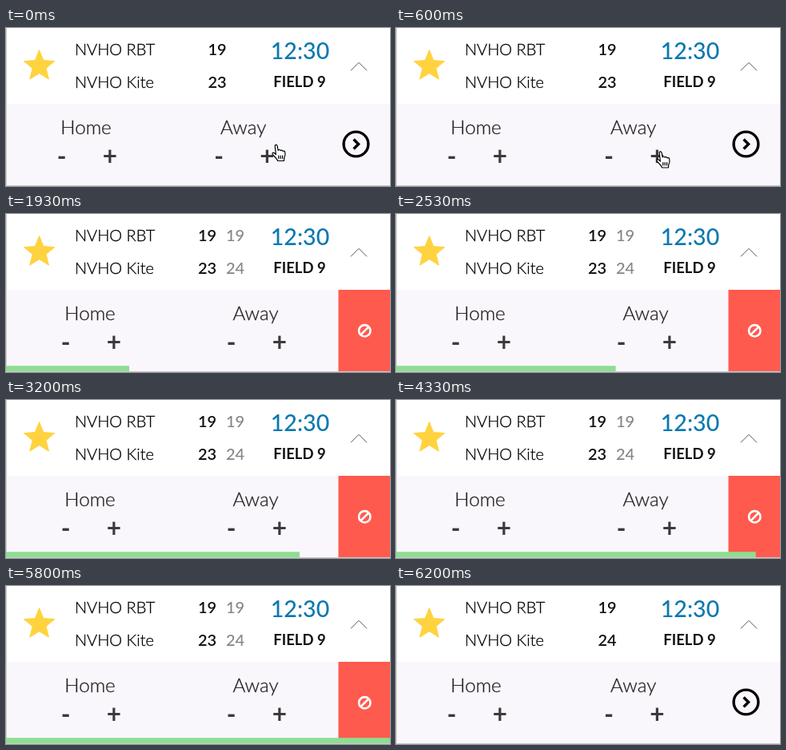
An HTML page for the animation above (6270 ms loop, 480 px wide and 198 px high).

```html
<!DOCTYPE html>
<html lang="en">
<head>
<meta charset="utf-8">
<title>Score entry with undo</title>
<style>
  html, body { margin: 0; width: 100%; height: 100%; overflow: hidden; background: #fff; }
  svg { display: block; width: 480px; height: 198px; font-family: Lato, "Open Sans", sans-serif; }
  text { fill: #111; }
  .team { font-size: 20px; font-weight: 300; fill: #000; stroke: #000; stroke-width: .3; }
  .mid { text-anchor: middle; }
  .score { font-size: 20px; font-weight: 600; }
  .next { font-size: 20px; font-weight: 500; fill: #858585; }
  .time { font-size: 28.6px; font-weight: 500; fill: #0b78b0; }
  .field { font-size: 18.5px; font-weight: 700; }
  .side { font-size: 24.2px; font-weight: 300; fill: #222; stroke: #222; stroke-width: .3; }
  .step { font-size: 31.5px; font-weight: 700; fill: #3a393c; }
  .line { fill: none; stroke: #000; }
</style>
</head>
<body>
<svg viewBox="0 0 480 198">
  <rect width="480" height="198" fill="#fff"/>
  <rect y="95" width="480" height="102" fill="#faf7fc"/>
  <path d="M.5 0V197M0 197.5H480" class="line" style="stroke:#cbcacb"/>

  <polygon id="star" fill="#ffd33f" stroke="#ffd33f" stroke-linejoin="round"/>
  <text class="team" x="86" y="34">NVHO RBT</text>
  <text class="team" x="86" y="75">NVHO Kite</text>
  <text class="time mid" x="367.5" y="39">12:30</text>
  <text class="field mid" x="367" y="73.7">FIELD 9</text>
  <path d="M431 53.3L441 43.3L451 53.3" class="line" style="stroke:#555"/>

  <text id="home" class="score mid" y="34">19</text>
  <text id="away" class="score mid" y="75">23</text>

  <g id="idle">
    <circle cx="437.5" cy="145.5" r="15.4" class="line" stroke-width="3.4"/>
    <path d="M434.6 139.5L440.6 145.5L434.6 151.5" class="line" stroke-width="3.4"/>
  </g>

  <g id="pending">
    <text class="next mid" x="286.5" y="34">19</text>
    <text class="next mid" x="286.5" y="75">24</text>
    <rect x="415.5" y="95" width="64.5" height="102" fill="#ff5a4e"/>
    <g class="line" style="stroke:#fff" stroke-width="2.6">
      <circle cx="448.3" cy="146.3" r="7.2"/>
      <path d="M443.3 151.3L453.3 141.3"/>
    </g>
    <rect id="bar" y="190.3" height="6.7" fill="#8cde90"/>
  </g>

  <g id="controls"></g>

  <g id="hand" stroke="#000" stroke-width="1.2" stroke-linejoin="round" stroke-linecap="round">
    <path fill="#fff" d="M4.2 2.2C4.2.6 6.6.4 7.1 2.2L8.2 8C8.6 6.6 10.8 6.7 11.1 8.2C11.8 7 13.6 7.4 13.9 9C14.8 8 16.6 8.6 16.8 10.4C17.4 13 17 15 15.8 17.2L15.4 21H7.6C7 18.6 4 16 1.4 13.2C0 11.4 1.6 10 3.4 11.2L5.4 13Z"/>
    <path fill="none" d="M8.8 14.5V18M11.2 14.5V18M13.6 14.5V18"/>
  </g>
  <path id="arrow" fill="#000" stroke="#fff" stroke-width="1.3" stroke-linejoin="round"
    d="M.5.5V18.4L4.5 14.6L7.7 22L11 20.6L7.9 13.3H13.3Z"/>
</svg>
<script>
  const LOOP = 6270, FRAME = 200 / 3;
  const CLICK = 877, UNDO_TIME = 5000;
  const LEAVE = 1270;

  const $ = id => document.getElementById(id);
  const show = (id, on) => { $(id).style.display = on ? "" : "none"; };

  // [time, x, y] of the pointer's top left corner
  const handPath = [[0, 332, 145.5], [200, 332, 145.5], [600, 325, 154], [CLICK, 325, 154]];
  const arrowPath = [[CLICK, 328, 155], [935, 327, 146], [1066, 324.5, 93], [LEAVE, 324, -24]];

  // Text centres before and after the controls make room for the undo button
  const controls = [
    ["Home", "side", 133, 100, 105],
    ["Away", "side", 133, 296.7, 312],
    ["-", "step", 171.6, 69.5, 74.5],
    ["+", "step", 171.6, 130, 135],
    ["-", "step", 171.6, 266, 281.5],
    ["+", "step", 171.6, 326.5, 342]
  ].map(([label, kind, y, x, shifted]) => {
    const node = document.createElementNS("http://www.w3.org/2000/svg", "text");
    node.textContent = label;
    node.setAttribute("class", kind + " mid");
    node.setAttribute("y", y);
    $("controls").append(node);
    return { node, x, shifted };
  });

  $("star").setAttribute("points", Array.from({ length: 10 }, (_, i) => {
    const r = i % 2 ? 8.9 : 20.2, a = i * Math.PI / 5;
    return [41.6 + r * Math.sin(a), 47.8 - r * Math.cos(a)].map(v => v.toFixed(2));
  }).join(" "));

  // CSS "ease": cubic-bezier(.25, .1, .25, 1)
  function ease(p) {
    if (p <= 0 || p >= 1) return Math.min(1, Math.max(0, p));
    let lo = 0, hi = 1;
    for (let i = 0; i < 24; i++) {
      const s = (lo + hi) / 2;
      if (0.75 * s * (1 - s) + s ** 3 < p) lo = s; else hi = s;
    }
    return 0.3 * lo * (1 - lo) ** 2 + 3 * lo * lo * (1 - lo) + lo ** 3;
  }

  function along(path, t) {
    let i = 1;
    while (i < path.length - 1 && t > path[i][0]) i++;
    const [a, b] = [path[i - 1], path[i]];
    const p = Math.min(1, Math.max(0, (t - a[0]) / (b[0] - a[0])));
    return [a[1] + (b[1] - a[1]) * p, a[2] + (b[2] - a[2]) * p];
  }

  function place(id, path, t) {
    $(id).setAttribute("transform", `translate(${along(path, t)})`);
  }

  function draw(ms) {
    const t = Math.floor((ms % LOOP + 3.34) / FRAME) * FRAME;
    const done = t >= CLICK + UNDO_TIME;
    const pending = t >= CLICK && !done;

    show("pending", pending);
    show("idle", !pending);
    show("hand", t < CLICK);
    show("arrow", t >= CLICK && t < LEAVE);
    place("hand", handPath, t);
    place("arrow", arrowPath, t);

    for (const id of ["home", "away"]) $(id).setAttribute("x", pending ? 251.5 : 264);
    $("away").textContent = done ? "24" : "23";
    for (const c of controls) c.node.setAttribute("x", pending ? c.shifted : c.x);
    $("bar").setAttribute("width", 480 * ease((t - CLICK) / UNDO_TIME));
  }

  const start = performance.now();
  function tick() {
    draw(performance.now() - start);
    requestAnimationFrame(tick);
  }
  tick();
</script>
</body>
</html>
```
